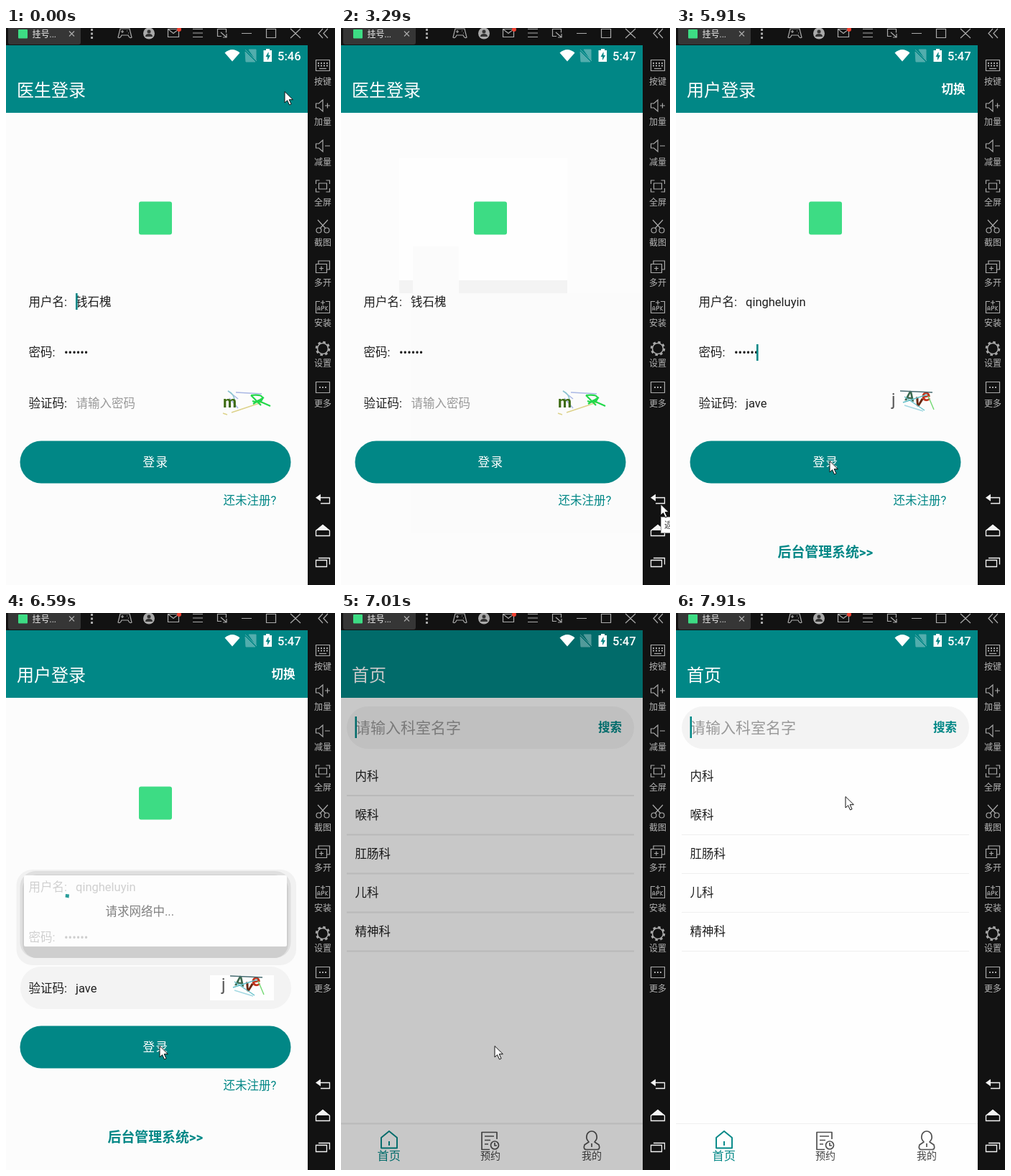
Write an HTML page that moves like this. It is 458 px wide and 775 px high and loops after 8000 ms.

```html
<!DOCTYPE html>
<html lang="zh-CN">
<head>
<meta charset="utf-8">
<title>登录</title>
<style>
html, body { margin: 0; width: 100%; height: 100%; overflow: hidden; background: #121212; }
svg { display: block; width: 458px; height: 775px; font: 16.5px Roboto, "Noto Sans CJK SC", "Noto Sans CJK", sans-serif; }
text { white-space: pre; }
.title { font-size: 24px; fill: #fff; }
.bold { font-weight: 700; }
.teal { fill: #018786; }
.hint { fill: #999; }
.line { fill: none; stroke: #aaa; stroke-width: 1.2; }
.side { font-size: 12px; fill: #b4b4b4; text-anchor: middle; }
.caret { fill: #018786; }

/* 8 s loop, 1% = 80 ms; every change is a hard cut */
[class*="a-"] { animation: 8s step-end infinite; }
.a-doctor { animation-name: doctor; }
.a-user { animation-name: user; }
.a-residue { animation-name: residue; }
.a-early { animation-name: early; }
.a-late { animation-name: late; }
.a-caret1 { animation-name: caret1; }
.a-caret2 { animation-name: caret2; }
.a-caret3 { animation-name: caret3; }
.a-tip { animation-name: tip; }
.a-fields { animation-name: fields; }
.a-press { animation-name: press; }
.a-button { animation-name: button; }
.a-dialog { animation-name: dialog; }
.a-home { animation-name: home; }
.a-rule { animation-name: rule; }
.a-rules { animation-name: rules; }
.a-dim { animation-name: dim; }
.a-pointer { animation-name: pointer; }
@keyframes doctor { 0% { opacity: 1 } 49.625%, 100% { opacity: 0 } }
@keyframes user { 0% { opacity: 0 } 49.625%, 100% { opacity: 1 } }
@keyframes residue { 0% { opacity: 0 } 4.625% { opacity: 1 } 49.625%, 100% { opacity: 0 } }
@keyframes early { 0% { opacity: 1 } 31%, 100% { opacity: 0 } }
@keyframes late { 0% { opacity: 0 } 31%, 100% { opacity: 1 } }
@keyframes caret1 {
  0%, 9.125%, 21.5%, 34.125%, 47.75% { opacity: 1 }
  3.125%, 15.875%, 29.125%, 41.125%, 49.625%, 100% { opacity: 0 }
}
@keyframes caret2 {
  0%, 55%, 67.25%, 80.5%, 100% { opacity: 0 }
  49.625%, 61.75%, 73.875% { opacity: 1 }
}
@keyframes caret3 { 0%, 98.875%, 100% { opacity: 1 } 92.5% { opacity: 0 } }
@keyframes tip {
  0%, 55%, 100% { opacity: 0 }
  21.5%, 53.375% { opacity: .33 }
  23%, 51.5% { opacity: .66 }
  24.5% { opacity: 1 }
}
@keyframes fields { 0% { opacity: 0 } 56.875% { opacity: 1 } 58.375%, 100% { opacity: 0 } }
@keyframes press { 0% { opacity: 0 } 80.5% { opacity: 1 } 84.25%, 100% { opacity: 0 } }
@keyframes button { 0% { fill: #018786 } 80.5% { fill: #10908e } 82.375%, 100% { fill: #018786 } }
@keyframes dialog { 0% { opacity: 0 } 82.375% { opacity: 1 } 84.25%, 100% { opacity: 0 } }
@keyframes home { 0% { opacity: 0 } 87.625%, 100% { opacity: 1 } }
@keyframes rule { 0% { opacity: 1 } 92.5%, 100% { opacity: 0 } }
@keyframes rules { 0% { stroke: #eaeaea; stroke-width: 2px } 92.5%, 100% { stroke: #efefef; stroke-width: 1px } }
@keyframes dim {
  0%, 92.5%, 100% { opacity: 0 }
  84.25% { opacity: .28 }
  85.75% { opacity: .21 }
  89.5% { opacity: .14 }
  91% { opacity: .07 }
}
@keyframes pointer {
  0% { transform: translate(388px, 88px) }
  3.125% { transform: translate(303px, 181px) }
  4.625% { transform: translate(81px, 349px) }
  6.125% { transform: translate(152px, 304px) }
  7.625% { transform: translate(180px, 420px) }
  9.125% { transform: translate(230px, 502px) }
  11% { transform: translate(340px, 590px) }
  12.5% { transform: translate(420px, 662px) }
  14.375% { transform: translate(441px, 666px) }
  15.875% { transform: translate(445px, 663px) }
  17.75% { transform: translate(445px, 662px) }
  47.75% { transform: translate(445px, 657px) }
  49.625% { transform: translate(430px, 600px) }
  51.5% { transform: translate(287px, 183px) }
  53.375% { transform: translate(230px, 260px) }
  55% { transform: translate(190px, 350px) }
  56.875% { transform: translate(175px, 397px) }
  58.375% { transform: translate(190px, 490px) }
  59.875% { transform: translate(211px, 597px) }
  61.75% { transform: translate(214px, 602px) }
  89.5% { transform: translate(219px, 480px) }
  91% { transform: translate(228px, 330px) }
  92.5% { transform: translate(233px, 250px) }
  94.375%, 100% { transform: translate(236px, 255px) }
}
</style>
</head>
<body>
<svg viewBox="0 0 458 775">
  <rect width="458" height="775" fill="#121212"/>

  <!-- login page -->
  <rect y="24" width="420" height="751" fill="#fcfcfc"/>
  <rect y="24" width="420" height="94" class="teal"/>
  <g class="a-residue">
    <rect x="81" y="181" width="234" height="170" fill="#fefefe"/>
    <path d="M81 351h19v18h-19zM164 351h151v18h-151z" fill="#f3f3f3"/>
    <path d="M100 304h64v65h256v334h-323v-334h3z" fill="#fbfbfb"/>
  </g>
  <rect x="185" y="241.500" width="46" height="46" rx="3" fill="#3ddc84"/>
  <path class="a-fields" d="M112 375h262v35h-262zM112 422h262v41h-262z" fill="#f3f3f3"/>
  <g class="a-press">
    <rect x="20" y="492" width="377" height="59" rx="29" fill="#f3f3f3"/>
    <rect x="284" y="504" width="89" height="35" fill="#fefefe"/>
  </g>
  <g fill="#1f1f1f">
    <g id="labels">
      <text x="31.500" y="387">用户名:</text>
      <text x="31.500" y="457">密码:</text>
      <text x="81" y="457">••••••</text>
    </g>
    <text x="97" y="387" class="a-doctor">钱石槐</text>
    <text x="97" y="387" class="a-user">qingheluyin</text>
    <text x="31.500" y="528">验证码:</text>
  </g>
  <rect class="a-button" x="19.500" y="574.500" width="377" height="59" rx="29.500" fill="#018786"/>
  <text x="190.500" y="610" fill="#fff" letter-spacing="1.500">登录</text>
  <text x="302.500" y="662.500" class="teal">还未注册?</text>

  <g class="a-doctor">
    <text x="15" y="95" class="title">医生登录</text>
    <text x="97.500" y="528" class="hint">请输入密码</text>
    <g fill="none" stroke-width="1.500">
      <path d="M309 505l14 11M320 507l36 2M311 515l12 14" stroke="#a9b7e4"/>
      <path d="M302 536l6 2M314 535l42-14" stroke="#ddd28a"/>
      <path d="M309 505q8 4 9 12" stroke="#8cc8d0"/>
      <path d="M341 511l14 14M341 511q17-2 16 5q-3 7-14 3M350 518l18 8M344 523l15-9" stroke="#22d84a" stroke-width="2.200"/>
    </g>
    <text x="302" y="527.500" font-size="22" class="bold" fill="#3d6b12">m</text>
  </g>
  <rect x="97" y="369" width="2.600" height="23" class="caret a-caret1"/>

  <g class="a-user">
    <text x="15" y="95" class="title">用户登录</text>
    <text x="369.500" y="91" class="bold" fill="#fff">切换</text>
    <text x="97" y="528" fill="#1f1f1f">jave</text>
    <text x="141.500" y="736" font-size="18.900" class="bold teal">后台管理系统&gt;&gt;</text>
    <g font-size="23" class="bold">
      <text x="300" y="525" fill="#555" font-weight="400">j</text>
      <text transform="translate(318 518) rotate(8)" font-size="20" fill="#3c6a50">A</text>
      <text transform="translate(331 525) rotate(14)" fill="#6a2a12">v</text>
      <text transform="translate(343 520) rotate(-10)" fill="#c0341c">e</text>
    </g>
    <g fill="none" stroke-width="1.400">
      <path d="M312 505l45 2" stroke="#456a70"/>
      <path d="M316 521l34-11M318 513l28 19" stroke="#62bfc8"/>
      <path d="M318 525l26 8" stroke="#a3d8e2"/>
      <path d="M351 512l8 19" stroke="#72d872"/>
    </g>
  </g>
  <rect x="112" y="440" width="2.600" height="23" class="caret a-caret2"/>

  <g class="a-dialog">
    <rect x="14.500" y="357" width="389.500" height="133" rx="22" fill="#f1f1f1"/>
    <rect x="19.500" y="359" width="377" height="121" rx="22" fill="#dfdfdf"/>
    <rect x="23" y="364" width="370" height="116" rx="20" fill="#cecece"/>
    <rect x="25" y="365" width="366" height="99" rx="2" fill="#fdfdfd"/>
    <g fill="#1f1f1f" opacity=".2">
      <use href="#labels"/>
      <text x="97" y="387">qingheluyin</text>
    </g>
    <text x="138.500" y="421" fill="#808080">请求网络中...</text>
    <path d="M83 391l5 .5-.5 5-5-1z" fill="#2a9d9a"/>
  </g>

  <!-- home page -->
  <g class="a-home">
    <rect y="24" width="420" height="751" fill="#fefefe"/>
    <rect y="24" width="420" height="94" class="teal"/>
    <text x="15" y="95" class="title">首页</text>
    <rect x="8" y="130" width="400" height="59" rx="29.500" fill="#f3f3f3"/>
    <text x="20" y="167" font-size="21" class="hint">请输入科室名字</text>
    <text x="358" y="165" class="bold teal">搜索</text>
    <rect x="19.500" y="144" width="2.500" height="30" class="caret a-caret3"/>
    <g fill="#1f1f1f">
      <text x="19.500" y="233">内科</text>
      <text x="19.500" y="287">喉科</text>
      <text x="19.500" y="341">肛肠科</text>
      <text x="19.500" y="395">儿科</text>
      <text x="19.500" y="449">精神科</text>
    </g>
    <path class="a-rule" d="M8 254h400" stroke="#eaeaea" stroke-width="2"/>
    <path class="a-rules" d="M8 308.500h400m-400 54h400m-400 54h400m-400 54h400M0 710.500h420" fill="none"/>
    <path d="M56 730l11-9 11 9v14.500h-22zM67 735v6" fill="none" stroke="#018786" stroke-width="1.900" stroke-linejoin="round"/>
    <g fill="none" stroke="#505050" stroke-width="1.700" stroke-linejoin="round">
      <path d="M217 732v-9.500h-21v24h11M200 728h13M200 733.500h8M200 739h5"/>
      <circle cx="214" cy="740.500" r="5.500"/>
      <path d="M214 737v4h3"/>
      <path d="M345 736q-4-4-3-8a7 7 0 0 1 14 0q1 4-3 8l6 4q2 6-2 6.500h-16q-4-.5-2-6.500zM349 738v5"/>
    </g>
    <text x="50.500" y="761" font-size="16.200" class="teal">首页</text>
    <text x="194" y="760" font-size="14" fill="#444">预约</text>
    <text x="335" y="760" font-size="14" fill="#444">我的</text>
  </g>

  <rect class="a-dim" y="24" width="420" height="751" opacity="0"/>

  <!-- phone status bar -->
  <g fill="#fff">
    <path d="M304.500 34.500q10.500-9 21 0l-10.500 12z"/>
    <path d="M338 30h10v15zM333 33l14 14h-13zM333 30l16 16" opacity=".32" stroke="#fff"/>
    <path d="M362 29h5v2h3v16h-11.500v-16h3.500z"/>
    <path d="M365.500 33l-4 7h2.500v5l4-7h-2.500z" fill="#018786"/>
    <g font-weight="500">
      <text x="378" y="45" class="a-early">5:46</text>
      <text x="378" y="45" class="a-late">5:47</text>
    </g>
  </g>

  <!-- window bar -->
  <path d="M3 0h101v20q0 3-3 3h-95q-3 0-3-3z" fill="#363636"/>
  <rect x="17" y="2" width="13" height="12.500" rx="1" fill="#3ddc84"/>
  <text x="36.500" y="13" font-size="12" fill="#eee">挂号...</text>
  <path d="M118 1h3v3h-3zM118 6.500h3v3h-3zM118 12h3v3h-3z" fill="#aaa"/>
  <circle cx="199" cy="7.500" r="8" fill="#aaa"/>
  <path d="M194 12q0-4 5-4t5 4zM196.500 5a2.500 2.500 0 0 1 5 0a2.500 2.500 0 0 1-5 0" fill="#333"/>
  <g class="line">
    <path d="M88 4.500l7 7m0-7l-7 7"/>
    <path d="M159 1h13l3 12q-3 2-5-3h-9q-2 5-5 3zM160 5h4m-2-2v4M168 4h1m1 3h1"/>
    <path d="M225.500 1.500h15v11h-15zl7.500 6 7.500-6"/>
    <path d="M260 1.500h14M260 7h14M260 12.500h14"/>
    <path d="M300 11.500h-5.500v-10h12v5M299 6l8 7m0-5v5h-5"/>
    <path d="M328 7.500h14M362.500 1.500h13v12h-13zM396 1l14 13m0-13l-14 13"/>
    <path d="M441 1l-6 6.500 6 6.500M448 1l-6 6.500 6 6.500"/>
  </g>
  <circle cx="241" cy="2" r="3" fill="#f04030"/>

  <!-- tool bar -->
  <g class="line">
    <path d="M431.500 44.500h19v15h-19z"/>
    <path d="M434 49h14M434 52.500h14" stroke-dasharray="2 2" stroke-width="2"/>
    <path d="M436 56.500h10"/>
    <path id="speaker" d="M431.500 105h4l5.500-5v16l-5.500-5h-4z"/>
    <use href="#speaker" y="56"/>
    <path d="M444 108h7m-3.500-3.500v7M444 164h7"/>
    <path d="M431.500 217v-5h5m9 0h5v5m0 6v5h-5m-9 0h-5v-5M435.500 216h11v8h-11z"/>
    <path d="M434 267l11 12M448 267l-11 12"/>
    <circle cx="435.500" cy="281.500" r="3.500"/>
    <circle cx="446.500" cy="281.500" r="3.500"/>
    <path d="M431.500 328.500h15v12h-15zM435 328v-4h15.500v12h-4M436 334.500h6m-3-3v6"/>
    <path d="M437 380.500h-5.500v16h19v-16h-5.500M441 379v6m-3-3h6"/>
    <path d="M434 393v-4l1.500-2 1.500 2v4m-3-2h3M439.500 393v-6h3v3h-3M445 387v6m3-6l-3 3 3 3" stroke-width="1"/>
    <circle cx="441" cy="446" r="7.500" stroke-width="1.600"/>
    <circle cx="441" cy="446" r="9" stroke-width="2.500" stroke-dasharray="3.534"/>
    <path d="M431.500 492.500h19v15h-19z"/>
    <path d="M436 500h12" stroke-width="2" stroke-dasharray="2 2"/>
  </g>
  <g class="side">
    <text x="441" y="79">按键</text>
    <text x="441" y="135">加量</text>
    <text x="441" y="191">减量</text>
    <text x="441" y="247">全屏</text>
    <text x="441" y="303">截图</text>
    <text x="441" y="359">多开</text>
    <text x="441" y="415">安装</text>
    <text x="441" y="471">设置</text>
    <text x="441" y="527">更多</text>
  </g>
  <g fill="none" stroke="#f4f4f4" stroke-width="1.300">
    <path d="M436 653.500h14.500v8h-12.500"/>
    <path d="M431 653.500l7-5v10z" fill="#f4f4f4" stroke="none"/>
    <path d="M431.500 699.500v7h19v-7l-9.500-8z"/>
    <path d="M431 699l10-8 10 8z" fill="#f4f4f4" stroke="none"/>
    <path d="M431.500 740.500h15v9h-15zM435 737.500h15.500v9"/>
  </g>

  <g class="a-tip">
    <rect x="445.500" y="680.500" width="40" height="22" fill="#fff" stroke="#999"/>
    <text x="450" y="696" font-size="12" fill="#444">返回</text>
  </g>
  <path class="a-pointer" d="M0 .5v15.500l3.600-3.300 2.900 6.300 2.600-1.100-2.900-6.200h5.200z" fill="#fff" stroke="#111"/>
</svg>
</body>
</html>
```
